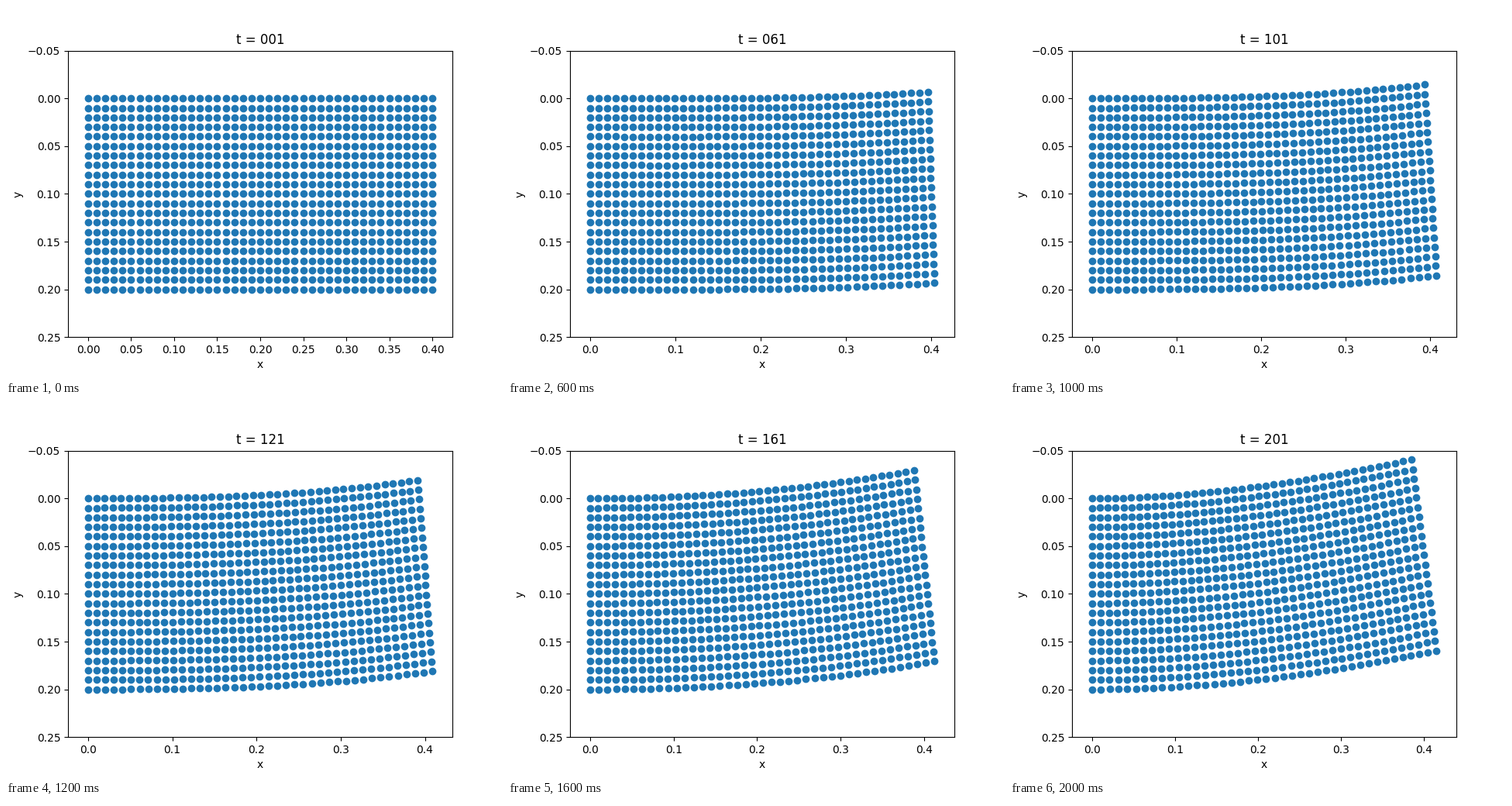
A matplotlib script that plays this animation: 640x480 px, repeating every 2100 ms.

```python
import numpy as np
import matplotlib.pyplot as plt
from matplotlib.animation import FuncAnimation

FRAMES = 21
LENGTH, HEIGHT = 0.4, 0.2
PAD = 25.95 / 444.1  # side margin as a share of the plate's extent

X, Y = np.meshgrid(np.linspace(0, LENGTH, 41), np.linspace(0, HEIGHT, 21))
U = X / LENGTH


def deform(tau):
    """Bend the clamped plate; tau runs from 0 to 1."""
    lift = tau * (0.01035 + 0.044 * tau - 0.01375 * tau**2)
    turn = tau * (0.0941 + 0.1325 * tau - 0.0766 * tau**2)
    # the bend starts near the free end and spreads to the clamp
    b = 2.6 - 3.9 * tau + 1.1 * tau**2
    d = 0.45 - 0.75 * b
    rotation = turn * U * (1 + d * (1 - U))
    x = X + (Y - HEIGHT / 2) * rotation
    y = Y - lift * U**2 * (1 + b * (U - 1))
    return x, y


fig, ax = plt.subplots(figsize=(6.4, 4.8), dpi=100)
dots = ax.scatter(X.ravel(), Y.ravel(), color="tab:blue")
ax.set_xlabel("x")
ax.set_ylabel("y")
ax.set_ylim(0.25, -0.05)
title = ax.set_title("t = 001")


def update(i):
    x, y = deform(i / (FRAMES - 1))
    dots.set_offsets(np.column_stack([x.ravel(), y.ravel()]))
    right = x.max()
    ax.set_xlim(-PAD * right, (1 + PAD) * right)
    title.set_text(f"t = {1 + 10 * i:03d}")
    return dots, title


anim = FuncAnimation(fig, update, frames=FRAMES, interval=100,
                     repeat=True, repeat_delay=0, blit=False)
plt.show()
```
